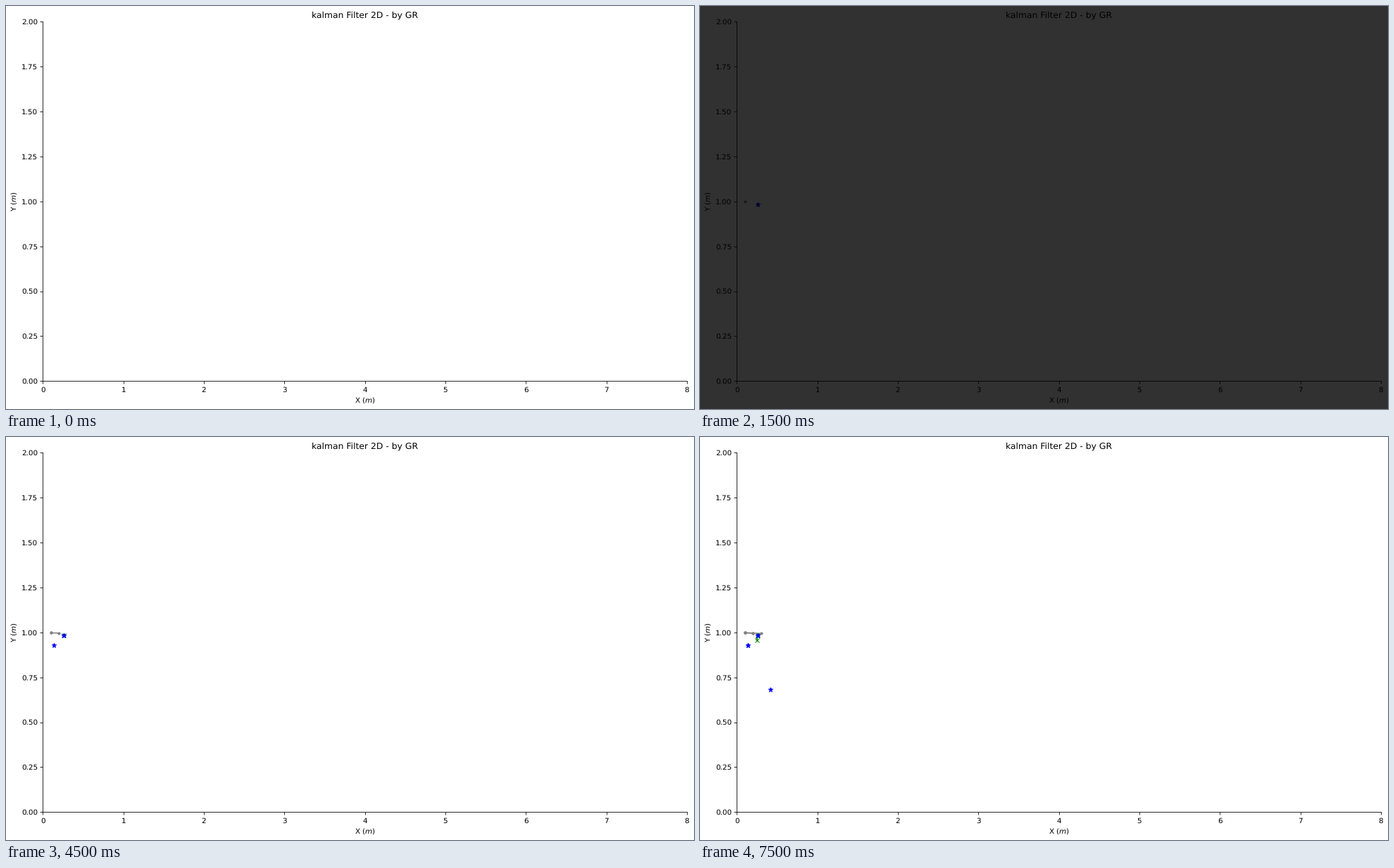
Write a matplotlib script that moves like this. It is 977 by 573 pixels and loops after 8 s.

```python
import matplotlib.pyplot as plt
from matplotlib.animation import FuncAnimation
from matplotlib.patches import Rectangle

W, H, DPI = 977, 573, 74.4
FRAMES, INTERVAL = 16, 500
DARK_STEP = 2

plt.rcParams["font.family"] = "DejaVu Sans"
plt.rcParams["text.hinting"] = "none"

truth = [(0.1, 0.9975), (0.2, 0.9965), (0.3, 0.994)]
measured = [(0.262, 0.983), (0.139, 0.927), (0.4165, 0.682)]
estimate = [(0.257, 0.983), (0.248, 0.955)]
series = [
    (truth, dict(color="gray", marker=".", linestyle="-")),
    (measured, dict(color="blue", marker="*", linestyle="none")),
    (estimate, dict(color="green", marker="x", linestyle="-")),
]

fig = plt.figure(figsize=((W + 0.01) / DPI, (H + 0.01) / DPI), dpi=DPI,
                 facecolor="white")
left, right, top, bottom = 52.4, 966.9, 22.5, 533.2
ax = fig.add_axes([left / W, 1 - bottom / H,
                   (right - left) / W, (bottom - top) / H])
ax.set_xlim(0, 8)
ax.set_ylim(0, 2)
ax.set_title("kalman Filter 2D - by GR")
ax.tick_params(axis="x", pad=4.2)
ax.set_xlabel("X ($m$)", labelpad=3.3)
ax.set_ylabel("Y ($m$)")
ax.spines[["top", "right"]].set_visible(False)

# Each step draws one series again, with its newest point, over the earlier ones.
layers = []
for step in range(8):
    points, style = series[step % 3]
    xs, ys = zip(*points[:step // 3 + 1])
    layers += ax.plot(xs, ys, **style)

shade = Rectangle((0, 0), 1, 1, transform=fig.transFigure, facecolor="black",
                  edgecolor="none", alpha=1 - 49 / 255, zorder=10)
fig.add_artist(shade)


def update(frame):
    step = (frame + 1) // 2
    for i, layer in enumerate(layers):
        layer.set_visible(i < step)
    shade.set_visible(step == DARK_STEP)
    return layers + [shade]


anim = FuncAnimation(fig, update, frames=FRAMES, interval=INTERVAL,
                     repeat=True, repeat_delay=0, blit=False)
plt.show()
```
